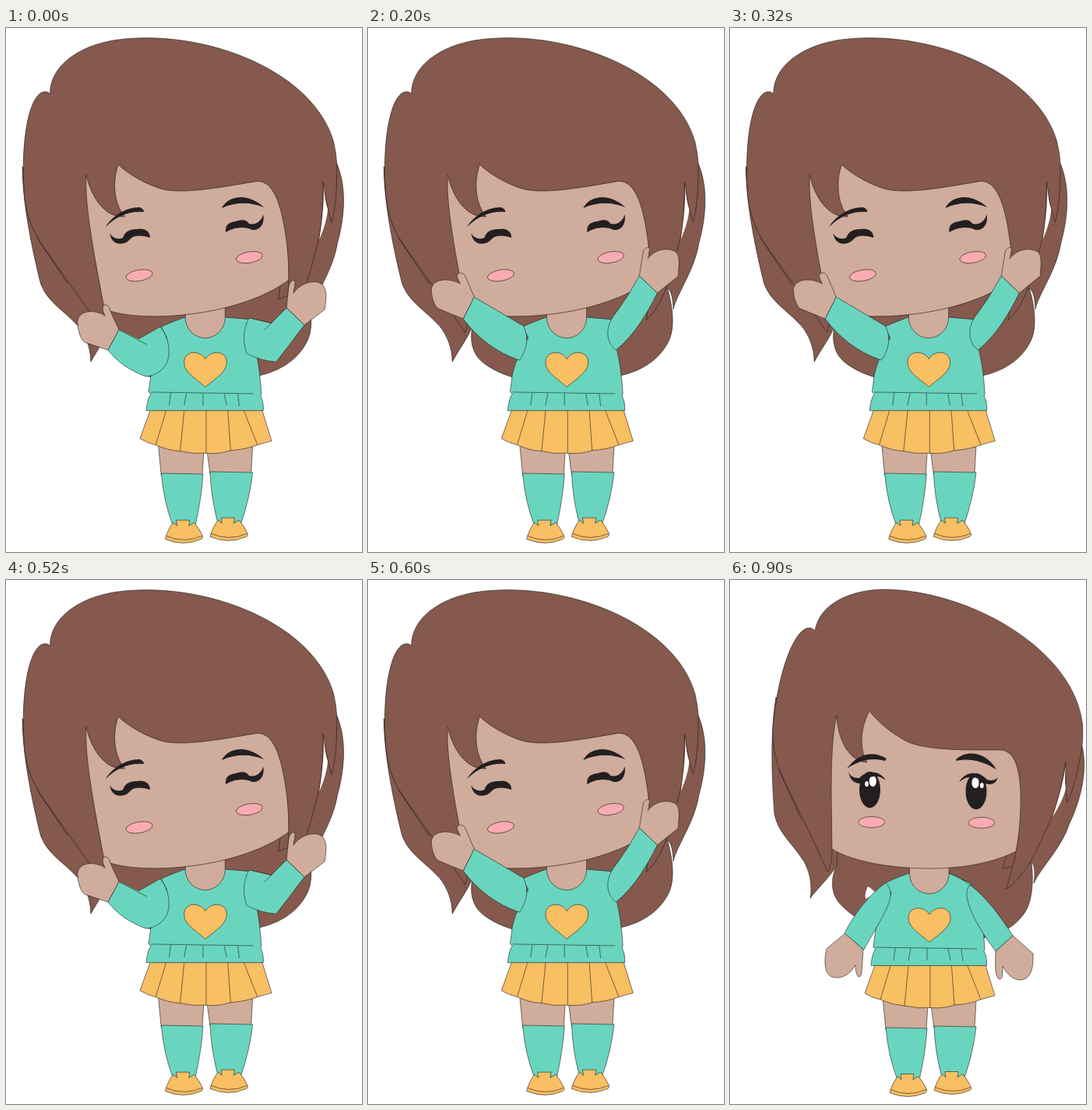
These frames come from a looping animation (457x672 px, 1 s). An HTML page:

```html
<!DOCTYPE html>
<html lang="en">
<head>
<meta charset="utf-8">
<title>Waving girl</title>
<style>
html, body { margin: 0; width: 100%; height: 100%; overflow: hidden; background: #fff; }
svg { display: block; width: 457px; height: 672px; }
</style>
</head>
<body>
<svg id="stage" viewBox="0 0 457 672"></svg>
<script>
const HAIR = '#85594d', SKIN = '#cfac9b', TEAL = '#6ad5bf', GOLD = '#f8bf63', PINK = '#f9abb1', INK = '#231f20';

const shape = (d, fill) => `<path d="${d}" fill="${fill}"/>`;
const line = d => shape(d, 'none');
const solid = (d, fill = INK) => `<path d="${d}" fill="${fill}" stroke="none"/>`;
const oval = (cx, cy, rx, ry, fill, extra = '') =>
  `<ellipse cx="${cx}" cy="${cy}" rx="${rx}" ry="${ry}" fill="${fill}" ${extra}/>`;
const group = (content, transform) => `<g transform="${transform}">${content}</g>`;

const backHair =
  shape('M137 366C129 382 129 402 141 415C150 425 163 435 184 444L230 460L307 461C340 460 366 447 380 424C388 410 390 385 387 362L340 330H130Z', HAIR) +
  solid('M177 393C174 399 173 404 174 409L188 402Q181 395 177 393Z', '#fff') +
  shape('M59 150C51 200 54 260 57 300C62 325 79 336 95 361C102 374 106 390 103 408C113 395 129 380 137 366L140 300Z', HAIR) +
  shape('M452 213C459 242 452 278 436 312C425 345 398 370 390 389C392 375 391 365 387 362L350 370L400 220Z', HAIR);

const head =
  solid('M128 160L131 345C160 363 215 370 256 370C300 370 340 362 367 348L375 300L380 200Z', SKIN) +
  line('M131 345C160 363 215 370 256 370C300 370 340 362 367 348') +
  shape('M109 65C115 30 155 12 200 12C310 14 442 90 452.500 185Q453.500 200 452 213C448 240 440 272 433 285Q430 265 431 233C426 260 421 285 413 304C395 345 380 380 354 397C364 368 374 330 373 275C372 238 364 218 346 218C300 218 250 219 225 206C205 195 190 182 179 168C168 188 165 215 176 234C150 232 138 200 137 174C128 210 130 280 131 345Q131 367 125 374C108 335 90 300 74 266C60 238 54 220 55 190C60 130 78 70 98 62Q105 60 109 65Z', HAIR) +
  solid('M431 238Q429 258 431 268Q427 284 414 304Q427 266 431 238Z', '#fff') +
  line('M62 242Q76 273 91 306') +
  oval(181.8, 310.5, 17, 7, PINK) +
  oval(323, 311.3, 16.8, 7, PINK);

const openEye = (x, y, glint, dot) =>
  oval(x, y, 13.5, 23.3, INK, 'stroke="none"') +
  oval(glint, y - 11, 4.6, 7, '#fff', 'stroke="none"') +
  oval(dot, y - 7.5, 2.4, 3.6, '#fff', 'stroke="none"');

const openEyes =
  openEye(179.5, 269, 183.3, 175.5) +
  openEye(316, 271, 315, 323.3) +
  solid('M152 246Q156 255 166 254C176 243 193 244 200 257C190 249 180 250 167 261Q155 261 152 246Z') +
  solid('M344 253Q339 259 330 256C320 245 303 244 294 259C304 251 315 250 328 261Q340 265 344 253Z') +
  solid('M150 242C162 225 182 217 201 229L199 232C180 227 165 232 150 242Z') +
  solid('M290 230C305 217 329 221 342 243C325 232 306 228 291 232Z');

const closedEyes =
  solid('M133 263C136 269 144 272 150 269C153 260 160 258 168 258C177 256 185 260 185 269C177 266 165 265 160 270C153 279 136 281 133 263Z') +
  solid('M282 262C281 253 286 249 295 248C304 245 309 246 312 251C319 253 328 249 330 239C333 252 325 260 316 259C308 254 292 255 282 262Z') +
  solid('M128 255C136 241 155 229 172 230Q177 232 177 236C160 234 143 240 128 255Z') +
  solid('M277 231C283 218 300 214 313 219Q324 223 331 230C316 224 297 222 277 231Z');

const shoe =
  shape('M10 3L15 7L14 0H31L30 7L37 3Q44 12 47.500 20Q48 23 46 24Q23 34 0 24Q3 12 10 3Z', GOLD) +
  line('M1 20Q24 30 47 20');

const pleats = (tops, bottoms) => tops.map((x, i) => line(`M${x} 495L${bottoms[i]}`)).join('');

const body = shoulder =>
  shape('M196 535L200 577H252L254 545Z', SKIN) +
  shape('M258 545L262 575H314L316 537Z', SKIN) +
  shape('M200 574L253 575Q251 606 243 641H215Q203 610 200 574Z', TEAL) +
  shape('M262 572L316 573Q312 607 301 638H272Q263 605 262 572Z', TEAL) +
  group(shoe, 'translate(205 633.5)') +
  group(shoe, 'translate(262 630.5)') +
  shape('M186 494L173 530Q183 536 193 538Q208 545 224 546Q241 550 257 548.500Q274 550 288 545Q307 544 322 538Q332 535 340 533L328 494Z', GOLD) +
  pleats([206, 229, 257, 284.5, 305], ['193 538', '224 546', '257 548.5', '288 545', '322 538']) +
  shape(`M230 376Q213 382 200 388L207 402Q192 426 187 448L184 471L187 473Q182 480 181 494.500H329.500Q330 483 326 476L327 473Q325 440 320 420L${shoulder}L281 376Z`, TEAL) +
  line('M187 471L317 473M212 472L210 488M232 472.500L229 488M253 472.500V488M280 473L283 488M297 473L299 489') +
  shape('M230.500 360V378A25.300 26 0 0 0 281 378V360Z', SKIN) +
  shape('M256 464.500C244 454 229 446 229 433C229 418 249 417 256 429C263 417 283 418 283 433C283 446 268 454 256 464.500Z', GOLD);

const armsOut =
  shape('M145 387L138 372L132 358C128 352 122 355 125 364L127 369C115 361 95 361 92 375C91 389 98 402 101 403L131 413Z', SKIN) +
  shape('M360 359L363 331C365 323 372 321 371 328L369 340C377 328 396 321 406 329C413 336 411 349 409 361L383 381Z', SKIN) +
  solid('M145 387L170 399L198 383C208 395 212 415 207 428C202 440 190 446 180 447C160 440 142 428 131 413Z', TEAL) +
  solid('M360 359L340 379L312 372C304 385 304 405 309 417C320 424 338 428 347 428L383 381Z', TEAL) +
  line('M181 406L145 387L131 413C142 428 160 440 180 447C190 446 202 440 207 428C212 415 208 395 198 383L170 399') +
  line('M332 387L360 359L383 381L347 428C338 428 320 424 309 417C304 405 304 385 312 372L341 378');

const armsUp =
  shape('M137 345L125 317C121 312 115 314 115 319L119 328C105 320 84 321 82 335C82 348 88 359 91 360L123 373Z', SKIN) +
  shape('M349 318L354 287C355 282 363 279 362 285L360 296C368 284 386 280 397 288C402 296 399 309 399 318L372 340Z', SKIN) +
  shape('M137 345L200 382C207 395 206 411 195 426C165 416 140 396 123 373Z', TEAL) +
  shape('M349 318L372 340C360 364 343 394 319 413C306 403 306 386 314 372Q334 346 349 318Z', TEAL);

const armsDown =
  shape('M148 453L124 473C120 490 121 509 135 510C148 511 156 502 161 494C161 502 163 509 166 509C170 508 169 497 170 490L171 474Z', SKIN) +
  shape('M363 456L389 479C390 500 385 513 372 513C362 512 355 505 350 495C350 505 350 512 346 512C341 510 340 499 341 476Z', SKIN) +
  shape('M200 388C178 404 159 429 147 453L172 474C181 457 193 439 201 421C208 406 208 397 200 388Z', TEAL) +
  solid('M281 376C318 390 342 424 363 456L341 476C327 457 307 429 304 405Q303 395 309 390Z', TEAL) +
  line('M281 376C318 390 342 424 363 456L341 476C327 457 307 429 304 405Q303 395 309 390');

const TILT = 'matrix(1 -.17 .17 1 -63.5 37.7)';
const STRETCH = 'matrix(1.012 0 0 1.0105 -3.1 -9)';

const cheer = arms =>
  group(backHair, TILT) + group(body('316 379'), STRETCH) + group(head, TILT) + closedEyes + arms;

const poses = [
  cheer(armsOut),
  group(cheer(armsUp), 'translate(-.7 0)'),
  backHair + body('309 389') + head + openEyes + armsDown
];

const stage = document.getElementById('stage');
stage.innerHTML = poses.map(p => `<g stroke="${INK}" stroke-width=".6" stroke-linejoin="round" visibility="hidden">${p}</g>`).join('');

// [start in ms, pose]
const steps = [[0, 0], [200, 1], [400, 0], [600, 1], [800, 0], [900, 2]];
const LOOP = 1000;
const start = performance.now();

function draw() {
  const t = Math.max(0, performance.now() - start) % LOOP;
  const pose = steps.filter(s => s[0] <= t).pop()[1];
  [...stage.children].forEach((g, i) => g.setAttribute('visibility', i === pose ? 'visible' : 'hidden'));
  requestAnimationFrame(draw);
}
draw();
</script>
</body>
</html>
```
